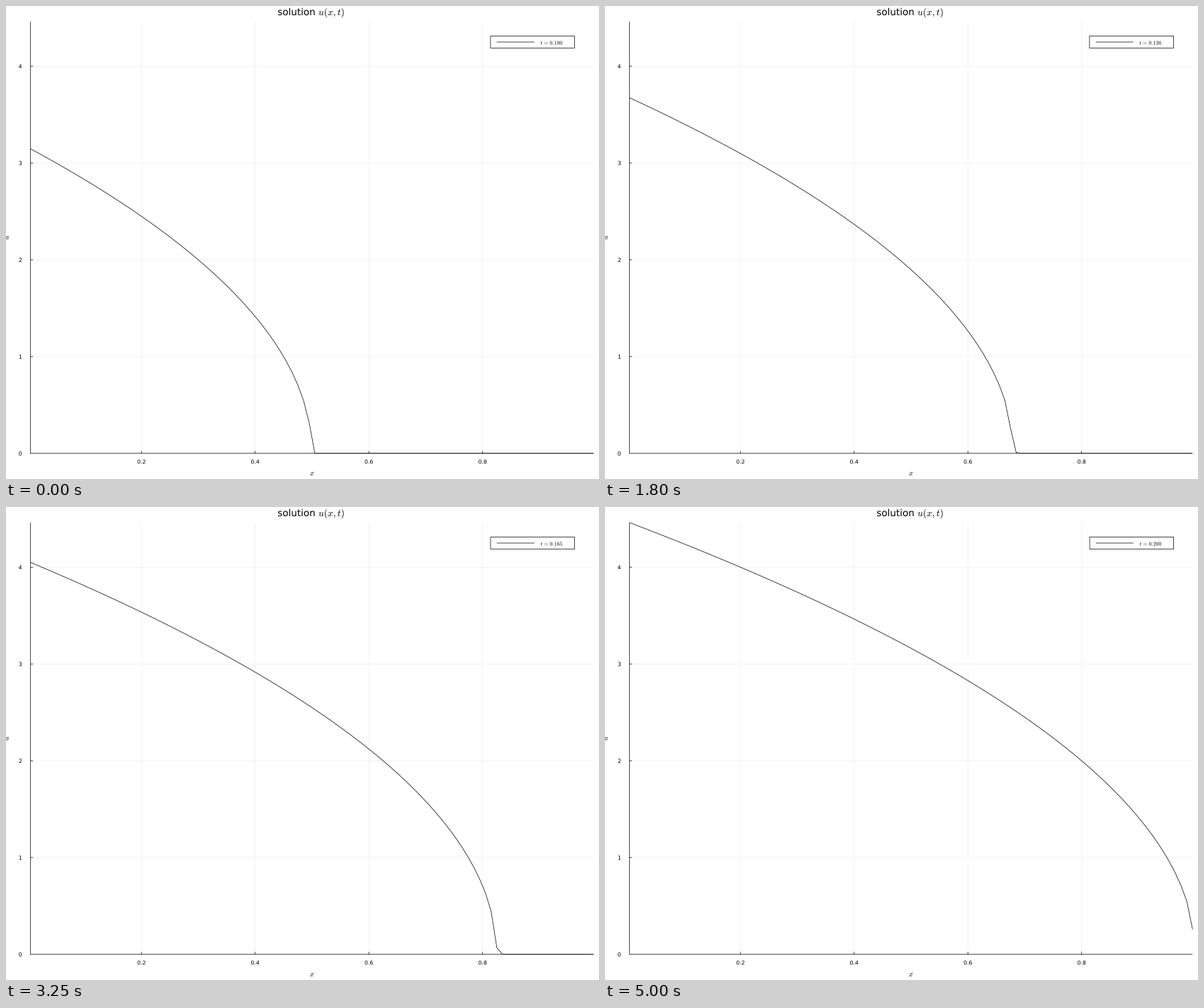
These frames come from a looping animation (837 by 669 pixels, 5.05 s). A matplotlib script:

```python
import numpy as np
import matplotlib.pyplot as plt
from matplotlib.animation import FuncAnimation
from matplotlib.patches import PathPatch, Rectangle
from matplotlib.textpath import TextPath
from matplotlib.transforms import Affine2D

W, H, DPI = 837, 669, 72  # at 72 dpi one point is one pixel
FRAMES, STEP_MS = 101, 50
SPEED = 5.0

plt.rcParams.update({
    "font.family": "DejaVu Sans",
    "mathtext.fontset": "cm",
    "path.snap": False,
    "toolbar": "None",
})

# Plot area in pixels
LEFT, RIGHT, TOP, BOTTOM = 34.6, 829.3, 22.3, 632.75
SMALL, LABEL, TITLE = 7.75, 10.65, 13.5
THIN = 0.72


def px(x):
    return LEFT + 802.7 * (x - 0.005)


def py(u):
    return BOTTOM - 136.9 * u


# Cell centres, and the smeared profile near the moving front
cells = 0.005 + 0.01 * np.arange(100)
front_s = [-0.010, -0.005, 0.0, 0.005, 0.010, 0.015]
front_u = [0.0, 0.007, 0.068, 0.258, 0.443, 0.5477]


def solution(i):
    s = SPEED * (0.1 + 0.001 * i) - cells
    u = np.sqrt(20 * np.maximum(s, 0))
    if i == 0:
        return u
    return np.where(s < 0.0149, np.interp(s, front_s, front_u), u)


fig = plt.figure(figsize=((W + 0.01) / DPI, (H + 0.01) / DPI), dpi=DPI,
                 facecolor="white")
ax = fig.add_axes([0, 0, 1, 1])
ax.set_xlim(0, W)
ax.set_ylim(H, 0)
ax.axis("off")


def line(x0, y0, x1, y1, alpha=1.0, z=2):
    return ax.plot([x0, x1], [y0, y1], color="black", lw=THIN, alpha=alpha,
                   zorder=z, solid_capstyle="butt")[0]


def text_path(text, x, y, size, align=0.5, turn=0):
    """Outline of text; align 0, 0.5 or 1 puts its ink left, mid or right at x."""
    path = TextPath((0, 0), text, size=size)
    ink = path.get_extents()
    move = Affine2D().translate(-ink.x0 - align * ink.width, 0).scale(1, -1)
    return move.rotate_deg(turn).translate(x, y).transform_path(path)


def label(*args, **kw):
    patch = PathPatch(text_path(*args, **kw), fc="black", lw=0, zorder=5)
    return ax.add_patch(patch)


GRID_ALPHA = 0.065
for v in (0.2, 0.4, 0.6, 0.8):
    x = px(v)
    line(x, TOP, x, BOTTOM, GRID_ALPHA, z=1)
    line(x, BOTTOM, x, BOTTOM - 3.5)
    label(f"{v:.1f}", x, 647.3, SMALL)
for v in range(5):
    y = py(v)
    if v:
        line(LEFT, y, RIGHT, y, GRID_ALPHA, z=1)
        line(LEFT, y, LEFT + 3.5, y)
    label(str(v), 22.1, y + 3, SMALL, align=1)

line(LEFT, TOP, LEFT, BOTTOM + THIN / 2)
line(LEFT, BOTTOM, RIGHT, BOTTOM)

label("solution $u(x,t)$", 384, 13, TITLE, align=0)
label("$x$", 431.9, 663.9, LABEL)
label("$u$", 3.7, 327.7, LABEL, turn=-90)

# Legend: its right edge stays put, its left edge follows the text width
BOX_RIGHT, TEXT_RIGHT = 802.5, 785
box = Rectangle((685, 42.5), 117, 17, fc="white", ec="black", lw=THIN,
                zorder=4)
ax.add_patch(box)
sample = line(694, 51, 747, 51, z=5)


def time_path(i):
    digits = f"{100 + i:03d}"
    kern = r"\!" if digits[0] == "1" else ""
    gap = r"\hspace{0.117}"
    text = rf"$t{gap}={gap}0.{kern}{digits}$"
    return text_path(text, TEXT_RIGHT, 54.6, SMALL, align=1)


time_text = ax.add_patch(PathPatch(time_path(0), fc="black", lw=0, zorder=5))
curve, = ax.plot([], [], color="black", lw=THIN, zorder=3,
                 solid_capstyle="butt", solid_joinstyle="round")


def draw(i):
    curve.set_data(px(cells), py(solution(i)))
    path = time_path(i)
    time_text.set_path(path)
    left = path.get_extents().x0 - 70.6
    box.set_x(left)
    box.set_width(BOX_RIGHT - left)
    sample.set_xdata([left + 8.8, left + 61.8])
    return curve, time_text, box, sample


anim = FuncAnimation(fig, draw, frames=FRAMES, interval=STEP_MS,
                     init_func=lambda: draw(0), repeat=True, repeat_delay=0,
                     blit=False)
plt.show()
```
